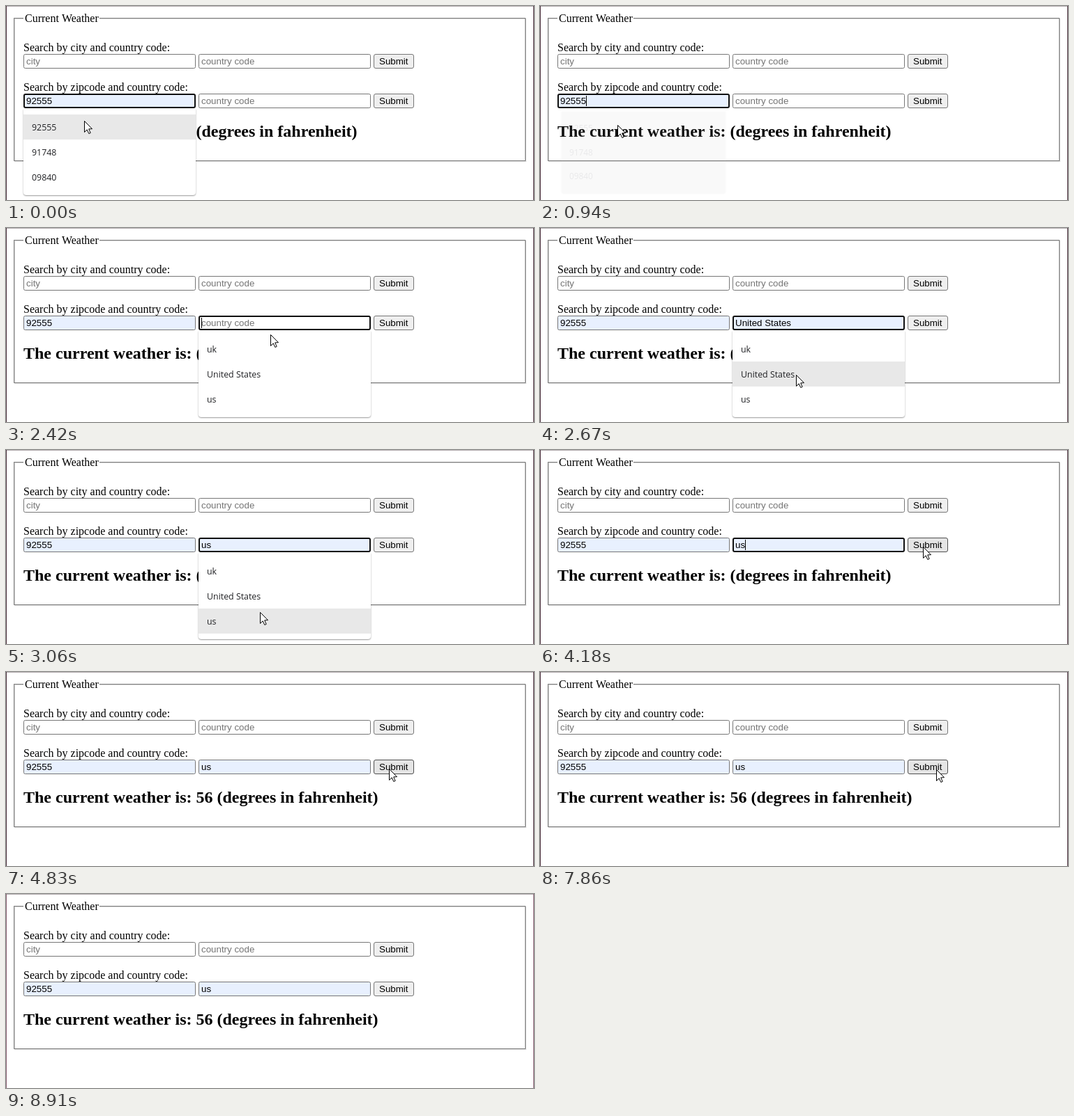
These frames come from a looping animation (757x279 px, 9.01 s). An HTML page with a canvas:

```html
<!DOCTYPE html>
<html lang="en">
<head>
<meta charset="utf-8">
<title>Current Weather</title>
<style>
html, body { margin: 0; width: 100%; height: 100%; overflow: hidden; background: #fff; }
canvas { display: block; }
</style>
</head>
<body>
<canvas id="stage" width="757" height="279"></canvas>
<script>
const ctx = document.getElementById('stage').getContext('2d');
const LOOP = 9010;
const SERIF = '"Liberation Serif", serif';
const SANS = '13.333px "Liberation Sans", sans-serif';
const MENU = '500 12.4px "Open Sans", sans-serif';
const LEFT = 25, RIGHT = 276, FIELD_W = 247, FIELD_H = 21;
const ROW_CITY = 69, ROW_ZIP = 126;
const AUTOFILL = '#e8f0fe';

// Each track lists [start time, value]; a value holds until the next entry.
const pointer = [
  [0, ['arrow', 112, 165]], [130, ['arrow', 111, 168]], [280, ['arrow', 111, 171]],
  [1080, ['arrow', 250, 153]], [1200, ['beam', 375, 136]], [1340, ['beam', 382, 137]],
  [2420, ['arrow', 379, 153]], [2540, ['arrow', 374, 180]], [2670, ['arrow', 367, 211]],
  [2790, ['arrow', 364, 233]], [3430, ['arrow', 385, 222]], [3560, ['arrow', 450, 187]],
  [3680, ['arrow', 520, 152]], [3810, ['arrow', 549, 139]], [7860, ['arrow', 568, 140]],
  [8000, ['arrow', 680, 222]], [8150, null]
];
const zipMenu = [[0, [1, 1, 0]], [820, [0.55, 0.98, -1]], [940, [0.07, 0.956, -1]], [1080, null]];
const countryMenu = [
  [0, null], [2000, [1, 1, -1]], [2540, [1, 1, 0]], [2670, [1, 1, 1]], [2790, [1, 1, 2]],
  [3180, [0.6, 0.98, -1]], [3300, [0.14, 0.96, -1]], [3430, null]
];
const country = [[0, ''], [2540, 'uk'], [2670, 'United States'], [2790, 'us']];
const focus = [[0, 'zip'], [2000, 'country'], [4320, '']];
const caret = [
  [0, 0], [570, 29], [820, 66], [1340, 0], [1880, 66], [2000, 280],
  [2540, 0], [3180, 294], [3680, 0], [4180, 294], [4320, 0]
];
const button = [[0, 'idle'], [3810, 'hover'], [4320, 'press'], [4830, 'hover'], [8000, 'idle']];
const buttonLook = {
  idle: ['#efefef', '#767676'],
  hover: ['#e5e5e5', '#4f4f4f'],
  press: ['#f5f5f5', '#8d8d8d']
};

function at(track, t) {
  let value = track[0][1];
  for (const [start, next] of track) if (t >= start) value = next;
  return value;
}

function rect(color, x, y, w, h) {
  ctx.fillStyle = color;
  ctx.fillRect(x, y, w, h);
}

function text(str, x, y, font, color = '#000') {
  ctx.font = font;
  ctx.fillStyle = color;
  ctx.fillText(str, x, y);
}

function box(x, y, w, h, radius, fill, stroke, line = 1) {
  ctx.beginPath();
  ctx.roundRect(x + line / 2, y + line / 2, w - line, h - line, radius);
  ctx.fillStyle = fill;
  ctx.fill();
  ctx.strokeStyle = stroke;
  ctx.lineWidth = line;
  ctx.stroke();
}

function field(x, y, value, hint, focused) {
  const fill = value ? AUTOFILL : '#fff';
  box(x, y, FIELD_W, FIELD_H, 2, fill, focused ? '#101010' : '#767676', focused ? 2 : 1);
  text(value || hint, x + 4, y + 15, SANS, value ? '#000' : '#757575');
}

function submit(y, state) {
  const [fill, stroke] = buttonLook[state];
  box(527, y, 58, FIELD_H, 2.5, fill, stroke);
  text('Submit', 535, y + 15, SANS);
}

function fieldset() {
  const groove = (inset, color) => {
    ctx.strokeStyle = color;
    ctx.lineWidth = 1;
    ctx.strokeRect(11.5 + inset, 17.5 + inset, 733, 205);
  };
  groove(1, '#d0d0d0');
  groove(0, '#808080');
  rect('#fff', 25, 16, 109, 4);
  text('Current Weather', 27, 23, '16px ' + SERIF);
}

function menu(x, items, state) {
  if (!state) return;
  const [alpha, scale, active] = state;
  ctx.save();
  ctx.globalAlpha = alpha;
  ctx.translate(x + FIELD_W / 2, 210);
  ctx.scale(scale, scale);
  ctx.translate(-x - FIELD_W / 2, -210);
  ctx.save();
  ctx.shadowColor = 'rgba(0,0,0,0.4)';
  ctx.shadowBlur = 2;
  ctx.shadowOffsetY = 1;
  ctx.fillStyle = '#fff';
  ctx.beginPath();
  ctx.roundRect(x, 148, FIELD_W, 124, [0, 0, 4, 4]);
  ctx.fill();
  ctx.restore();
  items.forEach((item, i) => {
    const y = 156 + i * 36;
    if (i === active) rect('#e8e8e8', x, y, FIELD_W, 36);
    text(item, x + 12, y + 23, MENU, '#202124');
  });
  ctx.restore();
}

function drawPointer(state) {
  if (!state) return;
  const [kind, x, y] = state;
  if (kind === 'beam') {
    rect('#000', x, y - 7, 1, 15);
    for (const dy of [-8, 8]) {
      rect('#000', x - 3, y + dy, 3, 1);
      rect('#000', x + 1, y + dy, 3, 1);
    }
    return;
  }
  ctx.save();
  ctx.translate(x + 0.5, y + 0.5);
  ctx.beginPath();
  ctx.moveTo(0, 0);
  for (const [px, py] of [[0, 16], [3.7, 12.4], [6.3, 18], [8.7, 17], [6.2, 11.4], [11, 11.2]])
    ctx.lineTo(px, py);
  ctx.closePath();
  ctx.fillStyle = '#fff';
  ctx.fill();
  ctx.strokeStyle = '#000';
  ctx.lineWidth = 1;
  ctx.stroke();
  ctx.restore();
}

function windowEdge(t) {
  const side = t < 8910 ? '#4a2f3c' : '#8a6072';
  rect('#b5afb2', 0, 0, 757, 1);
  rect(side, 0, 0, 1, 279);
  rect(side, 756, 0, 1, 279);
}

function draw(t) {
  rect('#fff', 0, 0, 757, 279);
  windowEdge(t);
  fieldset();

  const focused = at(focus, t);
  text('Search by city and country code:', LEFT, 65, '16px ' + SERIF);
  field(LEFT, ROW_CITY, '', 'city');
  field(RIGHT, ROW_CITY, '', 'country code');
  submit(ROW_CITY, 'idle');

  text('Search by zipcode and country code:', LEFT, 122, '16px ' + SERIF);
  field(LEFT, ROW_ZIP, '92555', '', focused === 'zip');
  field(RIGHT, ROW_ZIP, at(country, t), 'country code', focused === 'country');
  submit(ROW_ZIP, at(button, t));

  const caretX = at(caret, t);
  if (caretX) rect('#000', caretX, 129, 1, 15);

  const degrees = t < 4830 ? '' : '56 ';
  text(`The current weather is: ${degrees}(degrees in fahrenheit)`, LEFT, 188, 'bold 24px ' + SERIF);

  menu(LEFT, ['92555', '91748', '09840'], at(zipMenu, t));
  menu(RIGHT, ['uk', 'United States', 'us'], at(countryMenu, t));
  drawPointer(at(pointer, t));
}

const begin = performance.now();
function tick() {
  draw((performance.now() - begin) % LOOP);
  requestAnimationFrame(tick);
}
tick();
</script>
</body>
</html>
```
